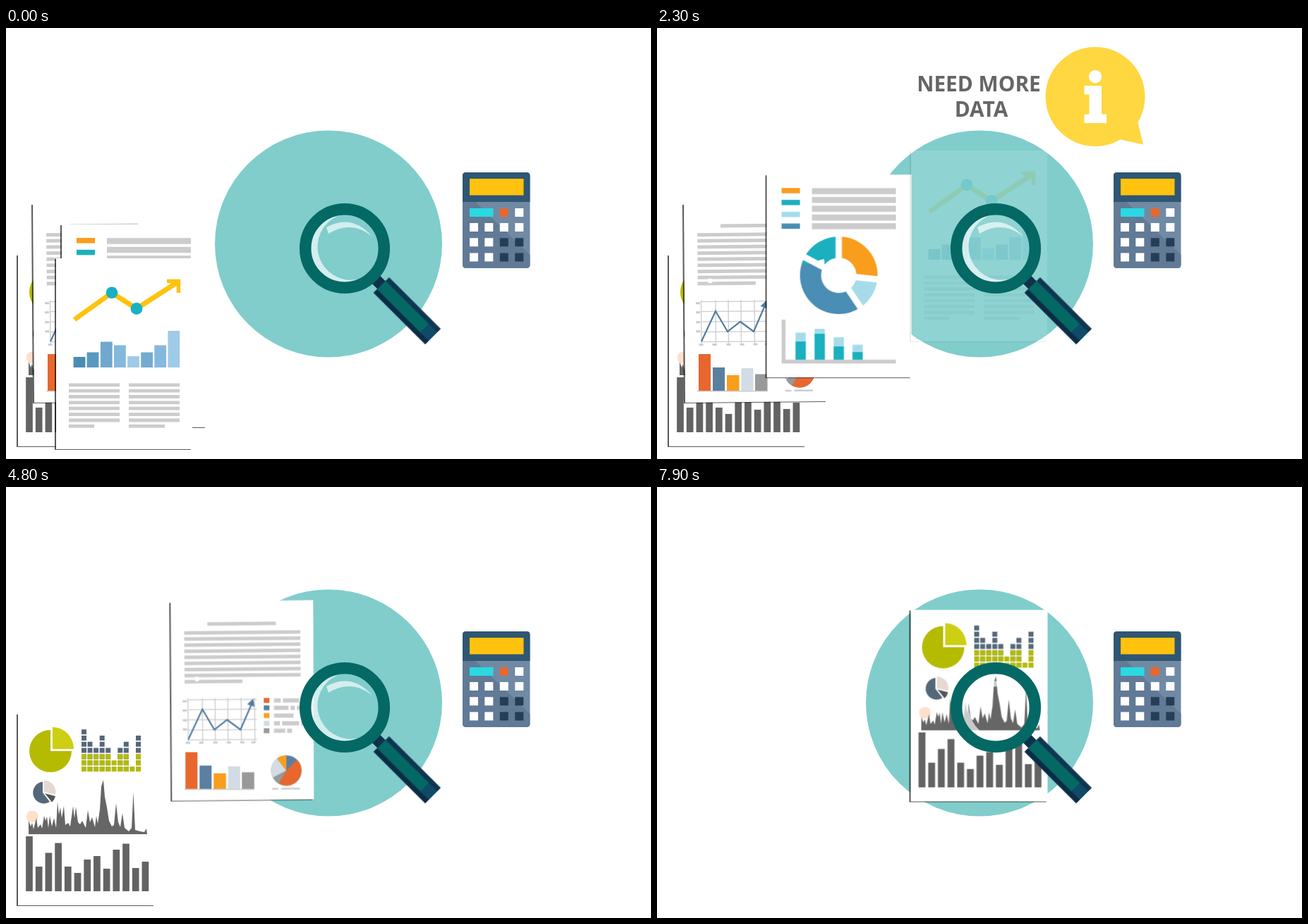
Write an HTML page without scripts that moves like this. It is 914 by 612 pixels and loops after 8000 ms.

```html
<!DOCTYPE html>
<html lang="en">
<head>
<meta charset="utf-8">
<title>Data review</title>
<style>
  html, body { margin: 0; width: 100%; height: 100%; overflow: hidden; background: #fff; }
  svg { display: block; width: 100%; height: 100%; }

  .paper { fill: #fff; filter: drop-shadow(-1.2px 1px .7px rgba(0, 0, 0, .65)); }
  .copy { fill: none; stroke: #ccc; }
  .line { fill: none; }
  .ring { fill: none; stroke-width: 30; }
  .pie { fill: none; stroke-width: 21.5; }
  .note text { font: 700 29.8px "Open Sans", sans-serif; fill: #666; text-anchor: middle; }

  /* translate carries x, transform carries y, so each has its own easing */
  .page, .lens, .note { animation: 8s linear infinite; }
  .a { animation-name: ax, ay, aFade; }
  .b { animation-name: bx, by, bFade; }
  .c { animation-name: cx, cy, cFade; }
  .d { animation-name: dx, dy; }
  .lens { animation-name: pulse; transform-origin: 516px 349px; }
  .note { animation-name: note; }

  @keyframes ax { 0%, 1% { translate: 0 0 } 7.5%, 100% { translate: 289px 0 } }
  @keyframes bx { 0%, 26% { translate: 0 0 } 36%, 100% { translate: 277px 0 } }
  @keyframes cx { 0%, 51% { translate: 0 0 } 65.4%, 100% { translate: 312px 0 } }
  @keyframes dx { 0%, 74.3% { translate: 0 0 } 92.3%, 100% { translate: 342.5px 0 } }

  @keyframes ay {
    0% { transform: none }
    1% { transform: translateY(0); animation-timing-function: cubic-bezier(.33, .85, .55, 1) }
    7.5%, 100% { transform: translateY(-153px) }
  }
  @keyframes by {
    0% { transform: none }
    26% { transform: translateY(0); animation-timing-function: cubic-bezier(.33, .85, .55, 1) }
    36%, 100% { transform: translateY(-120px) }
  }
  @keyframes cy {
    0% { transform: none }
    51% { transform: translateY(0); animation-timing-function: cubic-bezier(.2, .9, .4, 1) }
    65.4%, 100% { transform: translateY(-89px) }
  }
  @keyframes dy {
    0% { transform: none }
    74.3% { transform: translateY(0); animation-timing-function: cubic-bezier(.33, .85, .55, 1) }
    92.3%, 100% { transform: translateY(-147.5px) }
  }

  @keyframes aFade { 0%, 20% { opacity: 1 } 30%, 100% { opacity: 0 } }
  @keyframes bFade { 0%, 46.3% { opacity: 1 } 56.3%, 100% { opacity: 0 } }
  @keyframes cFade { 0%, 73.75% { opacity: 1 } 83.75%, 100% { opacity: 0 } }

  @keyframes pulse {
    0%, 7.25%, 13.75%, 36%, 42.5%, 64.75%, 71.25%, 92.3%, 98.4%, 100% { scale: 1 }
    10.6%, 39.4%, 68.1%, 95.6% { scale: 1.3 }
  }
  @keyframes note {
    0%, 20%, 31.2%, 45.6%, 56.9%, 73.1%, 84.4%, 100% { opacity: 0 }
    21.9%, 29.4%, 47.5%, 55%, 75%, 82.5% { opacity: 1 }
  }
</style>
</head>
<body>
<svg viewBox="0 0 914 612">
  <circle cx="457" cy="306.5" r="161" fill="#80cdcc"/>

  <!-- page with pies, blocks and spectrum -->
  <g class="page d">
    <rect class="paper" x="17" y="322" width="194" height="272"/>
    <path d="M63 375V345A30 30 0 1 0 93 375Z" fill="#b4bb00"/>
    <path d="M66 372V341A30 31 0 0 1 96 372Z" fill="#cccf12"/>
    <g class="line" stroke-width="7" stroke-dasharray="7 1.8">
      <path stroke="#55687a" d="M110.5 404v-60M119 404v-42.2M127.6 404v-33.4M136.2 404v-51M144.7 404v-33.4M161.8 404v-33.4M170.3 404v-42.2M187.5 404v-51"/>
      <path stroke="#b4bb00" d="M110.5 404v-24.6M119 404v-24.6M127.6 404v-24.6M136.2 404v-24.6M144.7 404v-24.6M153.2 404v-15.8M161.8 404v-24.6M170.3 404v-24.6M178.9 404v-7M187.5 404v-24.6"/>
    </g>
    <path d="M52 434V418.500A15.500 15.500 0 1 0 62 447Z" fill="#55687a"/>
    <path d="M54 433V416.500A16.500 16.500 0 0 1 70 437Z" fill="#e5dad2"/>
    <path d="M55 435L70 439A16 16 0 0 1 65 447.500Z" fill="#555"/>
    <rect x="29" y="460" width="16.500" height="16" rx="7" fill="#fde0cb"/>
    <path fill="#666" d="M32 493V474L35 482 37 477 39 486 43 470 45 484 49 479 51 485 54 467 56 474 58 468 60 484 62 467 65 482 68 470 71 484 73 447 75 465 77 455 79 470 82 453 84 480 88 477 91 482 95 453 97 470 99 454 102 476 105 479 108 474 113 484 116 459 119 476 122 469 126 483 128 467 130 478 133 458 135 425 138 416 140 440 143 455 146 474 150 482 153 480 156 449 159 476 162 483 165 463 168 484 174 489 178 484 180.500 433 183 487 190 489 196 490 199 485 200 493Z"/>
    <path class="line" stroke="#636363" stroke-width="9.700" d="M33 574V496M46.700 574V539M60.400 574V519.500M74.100 574V505.500M87.800 574V539M101.500 574V548M115.200 574V529M128.900 574V524M142.600 574V542M156.300 574V515M170 574V506.500M183.700 574V541M197.400 574V532"/>
  </g>

  <!-- page with trend grid and legend -->
  <g class="page c">
    <path class="paper" d="M38 250L240 247 241 530 40 532Z"/>
    <g transform="rotate(-.5 140 390)">
      <path class="copy" stroke-width="5" d="M91 280.500h97M58 293h164.500M58 301.600h164.500M58 310.300h164.500M58 319h164.500M58 327.600h164.500M58 336.300h164.500M58 345h164.500M58 353.600h164.500M58 362.300h82"/>
      <circle cx="75.500" cy="358.500" r="3.500" fill="#fff"/>
      <path class="copy" stroke-width="1.300" d="M62.500 386v61M83 386v61M101 386v61M119 386v61M138 386v61M157 386v61M62 388h98M62 402h98M62 416.500h98M62 431h98M62 445h98"/>
      <path class="copy" stroke-width="3" d="M55 390h6M55 403h6M55 417h6M55 430h6M59 449h6M78 449h6M98 449h6M117 449h6M136 449h6M152 449h6"/>
    </g>
    <path class="line" stroke="#527ca0" stroke-width="2.200" d="M63 445L83 402 100 431 118 417 137 431 153 394"/>
    <path fill="#527ca0" d="M155 387L146.500 395 157 398.500Z"/>
    <path fill="#e8672e" d="M170 386h8v7h-8zM59 463h17v52h-17z"/>
    <path fill="#5a7fa0" d="M170 396.500h8v7h-8zM79 482h17v33h-17z"/>
    <path fill="#f99d1c" d="M170 407.500h8v7h-8zM99 493h17.500v22h-17.500z"/>
    <path fill="#d3dce4" d="M170 418.500h8v7h-8zM119.500 483h17v32h-17z"/>
    <path fill="#999" d="M170 429h8v7h-8zM139 491.500h17.500v23.500h-17.500z"/>
    <path class="copy" stroke-width="6" d="M184.500 389.500h9.500M197 389.500h23M184.500 400h20.500M208 400h6M217 400h15M184.500 411h27.500M184.500 422h8.500M196 422h24M223 422h9.500M184.500 432.500h16M203 432.500h7"/>
    <path class="copy" stroke-width="1.600" d="M57 515.800h100"/>
    <g class="pie" transform="translate(202 489) rotate(-90)">
      <circle r="10.750" stroke="#5a7fa0"/>
      <circle r="10.750" pathLength="360" stroke="#e8672e" stroke-dasharray="165 195" transform="rotate(45)"/>
      <circle r="10.750" pathLength="360" stroke="#999" stroke-dasharray="32 328" transform="rotate(210)"/>
      <circle r="10.750" pathLength="360" stroke="#d3dce4" stroke-dasharray="80 280" transform="rotate(242)"/>
      <circle r="10.750" pathLength="360" stroke="#f99d1c" stroke-dasharray="38 322" transform="rotate(322)"/>
    </g>
    <path class="copy" stroke-width="2.500" d="M182 515h8.500M194.500 514.800h26.500"/>
  </g>

  <!-- page with donut -->
  <g class="page b">
    <rect class="paper" x="79" y="279" width="205" height="288"/>
    <g class="line" stroke-width="7.500">
      <path stroke="#f99d1c" d="M100 301.800h26"/>
      <path stroke="#1ab0c0" d="M100 318.600h26"/>
      <path stroke="#a6dcea" d="M100 335.600h26"/>
      <path stroke="#4a8db5" d="M100 352.200h26"/>
    </g>
    <path class="copy" stroke-width="8.500" d="M143 302.500h119M143 315h119M143 327.500h119M143 340h119M143 352.300h119"/>
    <g transform="translate(181 422)">
      <g class="ring" transform="rotate(-90)">
        <circle r="40" pathLength="360" stroke="#f99d1c" stroke-dasharray="96 264"/>
        <circle r="40" pathLength="360" stroke="#a6dcea" stroke-dasharray="50 310" transform="rotate(96)"/>
        <circle r="40" pathLength="360" stroke="#4a8db5" stroke-dasharray="152 208" transform="rotate(146)"/>
        <circle r="40" pathLength="360" stroke="#1ab0c0" stroke-dasharray="62 298" transform="rotate(298)"/>
      </g>
      <g stroke="#fff" stroke-width="9">
        <path d="M0 0V-58"/>
        <path d="M0 0V-58" transform="rotate(96)"/>
        <path d="M0 0V-58" transform="rotate(146)"/>
        <path d="M0 0V-58" transform="rotate(298)"/>
      </g>
    </g>
    <path class="copy" stroke-width="5.500" d="M102.800 485V544.500H262"/>
    <g class="line" stroke-width="14.500">
      <path stroke="#a6dcea" d="M127 541.800V503.500M154 541.800V498M181 541.800V510M207.700 541.800V520.500"/>
      <path stroke="#1ab0c0" d="M127 541.800V516M154 541.800V505M181 541.800V523M207.700 541.800V531"/>
    </g>
  </g>

  <!-- page with rising arrow -->
  <g class="page a">
    <rect class="paper" x="71" y="327" width="193" height="271"/>
    <path class="line" stroke="#ffc20e" stroke-width="7" d="M97 414L150 376 185 398.500 243 361"/>
    <path class="line" stroke="#ffc20e" stroke-width="5.500" d="M228 359.500H244.500V376"/>
    <g fill="#1ab0c4">
      <circle cx="150" cy="375.800" r="8.400"/>
      <circle cx="185" cy="398.500" r="8.400"/>
    </g>
    <g class="line" stroke-width="16.800">
      <path stroke="#4a8db3" d="M104 482V467"/>
      <path stroke="#5a99be" d="M123 482V460.500"/>
      <path stroke="#70a8cd" d="M142.300 482V445.500"/>
      <path stroke="#84b9dc" d="M161.400 482V450.500M218.700 482V450.500"/>
      <path stroke="#9fcbe8" d="M180.500 482V466M237.800 482V430"/>
      <path stroke="#74abd0" d="M199.600 482V460.500"/>
    </g>
    <path class="copy" stroke-width="4.800" d="M89 506.800h72M89 515.200h72M89 523.500h72M89 531.900h72M89 540.200h72M89 548.600h72M89 557h72M89 565.300h36M174 506.800h72M174 515.200h72M174 523.500h72M174 531.900h72M174 540.200h72M174 548.600h72M174 557h72M174 565.300h51"/>
  </g>

  <g class="lens">
    <g transform="translate(480 313) rotate(45)">
      <path fill="#11304a" d="M61 -8h14v16h-14z"/>
      <path fill="#0f3550" d="M73.500 -15.500h103.500v31h-103.500z"/>
      <path fill="#0b2c44" d="M73.500 8.500h103.500v7h-103.500z"/>
      <path fill="#046865" d="M73.500 -8.500h87v17h-87z"/>
      <path fill="#0f4a68" d="M160.500 -8.500h16.500v17h-16.500z"/>
    </g>
    <g fill="#fff" opacity=".65">
      <path d="M470 267A47.500 47.500 0 1 0 497 357A47.300 47.300 0 0 1 470 267Z"/>
      <path d="M454 283Q490 263 519 296Q490 272 457 292Z"/>
    </g>
    <circle cx="480" cy="313" r="55.800" fill="none" stroke="#046865" stroke-width="16.500"/>
  </g>

  <!-- calculator -->
  <rect x="647" y="205" width="95.500" height="136" rx="4.500" fill="#718aa4"/>
  <path fill="#617a96" d="M647 247H665L742.500 322V336.500A4.500 4.500 0 0 1 738 341H651.500A4.500 4.500 0 0 1 647 336.500Z"/>
  <path fill="#2f5673" d="M647 247V209.500A4.500 4.500 0 0 1 651.500 205H738A4.500 4.500 0 0 1 742.500 209.500V247Z"/>
  <path fill="#ffc20e" d="M657 214h76.500v23.500h-76.500z"/>
  <g class="line" stroke-width="12">
    <path stroke="#2ad9e2" d="M657 262h33.500"/>
    <path stroke="#e8672e" d="M699.800 262h12"/>
    <path stroke="#fff" d="M721.300 262h12M657 283h12M678.300 283h12M699.800 283h12M721.300 283h12M657 304.300h12M678.300 304.300h12M657 325.500h12M678.300 325.500h12"/>
    <path stroke="#263e55" d="M699.800 304.300h12M721.300 304.300h12M699.800 325.500h12M721.300 325.500h12"/>
  </g>

  <g class="note">
    <text x="456" y="90">NEED MORE</text>
    <text x="459.500" y="125.500">DATA</text>
    <circle cx="621" cy="97.500" r="70.500" fill="#ffd740"/>
    <path fill="#ffd740" d="M655 158L689 165.500 681 132Z"/>
    <circle cx="621" cy="69" r="9.200" fill="#fff"/>
    <path fill="#fff" d="M605.500 82H630V122.500H637V135H605.500V122.500H612.500V94.500H605.500Z"/>
  </g>
</svg>
</body>
</html>
```
